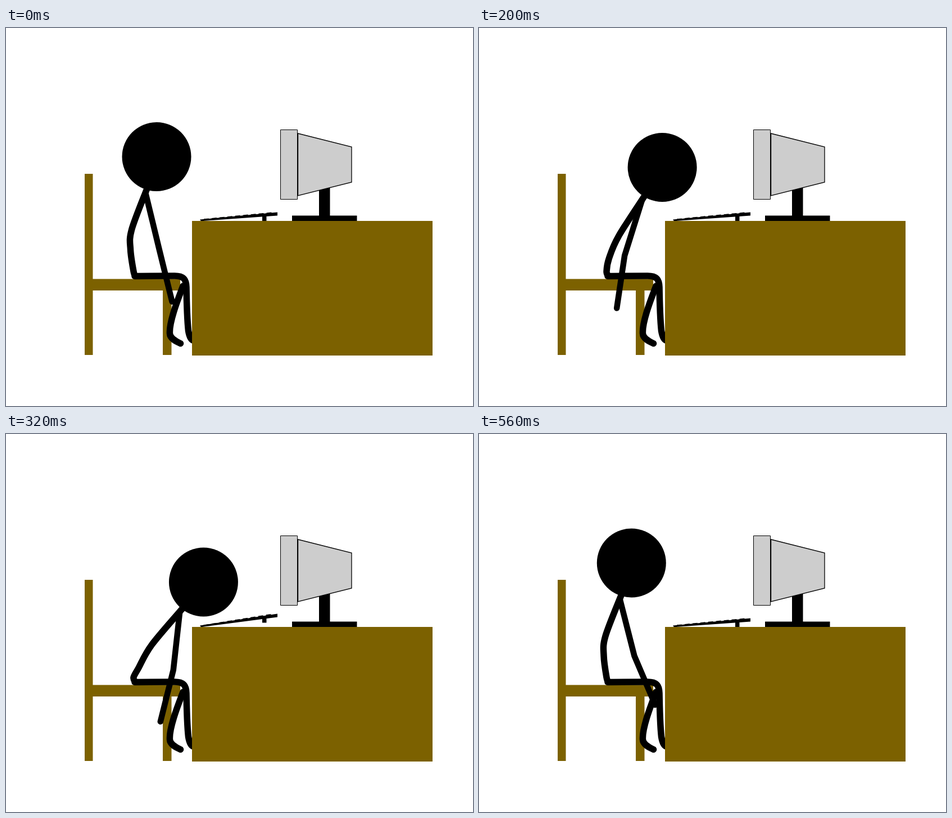
Recreate the animation shown at these times as an HTML page. Size 831 by 674 pixels, loop 600 ms.

```html
<!DOCTYPE html>
<html lang="en">
<head>
<meta charset="utf-8">
<title>Desk</title>
<style>
  html, body { margin: 0; width: 100%; height: 100%; overflow: hidden; background: #fff; }
  svg { display: block; width: 831px; height: 674px; }
  .wood { fill: #7c6100; }
  .limb { fill: none; stroke: #000; stroke-width: 11.5; stroke-linecap: round; stroke-linejoin: round; }
  .case { fill: #cdcdcd; stroke: #000; stroke-width: 1.3; }
</style>
</head>
<body>
<svg viewBox="0 0 831 674">
  <path class="wood" d="M140 260h14.500v187.500H310V468h-15.500V583H279V468H154.500V583H140z"/>

  <path d="M557 280h19.500v54.500h48V345H509v-10.500h48z"/>
  <path class="case" d="M519.500 188L615 212v63l-95.500 24z"/>
  <path class="case" d="M488.500 181.500h30v124h-30z" style="stroke-width:1"/>
  <path d="M518 188h2v111h-2z"/>

  <path id="board"/>
  <path id="keys" fill="none" stroke="#000" stroke-width="1.500" stroke-dasharray="9 5"/>
  <path id="foot"/>

  <path class="limb" d="M315 460C305 486 290 525 291.500 545C292 554 303 559 310.500 562.500"/>
  <path class="limb" d="M229 442.500L300 442C316 442 320.500 448 321 462C321.500 490 322.500 522 324.500 540Q327 555 333 557"/>
  <path class="limb" id="spine"/>
  <path class="limb" id="arm" style="stroke-width:10.500"/>
  <circle id="head" r="61.500"/>

  <path class="wood" d="M331 344h428v240H331z"/>
</svg>
<script>
const STEP = 40, COUNT = 15, HIT = 7;

const $ = id => document.getElementById(id);
const setPath = (id, d) => $(id).setAttribute('d', d);
const poly = pts => 'M' + pts.map(p => p.join(' ')).join('L');

// Smooth rise from 0 to 1 between steps a and b
function ramp(n, a, b) {
  const k = Math.min(1, Math.max(0, (n - a) / (b - a)));
  return k * k * (3 - 2 * k);
}

// Point at a distance from p, angle measured from straight down
function reach([x, y], len, deg) {
  const a = deg * Math.PI / 180;
  return [x + len * Math.sin(a), y + len * Math.cos(a)];
}

function smooth(pts) {
  let d = 'M' + pts[0];
  for (let i = 0; i < pts.length - 1; i++) {
    const a = pts[i], b = pts[i + 1];
    const prev = pts[i - 1] || a, next = pts[i + 2] || b;
    const c1 = a.map((v, j) => v + (b[j] - prev[j]) / 6);
    const c2 = b.map((v, j) => v - (next[j] - a[j]) / 6);
    d += `C${c1} ${c2} ${b}`;
  }
  return d;
}

// Speeds up into the blow, then slows down on the way back
function leanAt(n) {
  return n <= HIT ? 4.75 * n + 1.375 * n * n : 3.3 * (COUNT - n) ** 1.66;
}

function drawBody(n) {
  const lean = leanAt(n);
  const head = [268 + lean, 229.5 + 0.13 * lean + 0.0034 * lean * lean];
  const tilt = -16.7 - 0.26 * lean;

  $('head').setAttribute('cx', head[0]);
  $('head').setAttribute('cy', head[1]);
  setPath('spine', smooth([
    reach(head, 60, tilt),
    [223.5 + 0.43 * lean, 360 + 0.19 * lean],
    [221.5 + 0.17 * lean, 395 + 0.27 * lean],
    [227, 434],
    [230, 442]
  ]));

  const upper = 13.6 - 31 * ramp(n, 0, 4) + 33.6 * ramp(n, 5.5, 12) - 2.6 * ramp(n, 12, 15);
  const lower = 13.8 - 27.8 * ramp(n, 0, 7) + 37 * ramp(n, 8, 10.9);
  const shoulder = reach(head, 68, tilt);
  const elbow = reach(shoulder, 104, upper);
  setPath('arm', poly([shoulder, elbow, reach(elbow, 95, lower)]));
}

// The far edge jumps first, the near edge follows, both drop together
function drawKeyboard(n) {
  const drop = ramp(n, 10, 12.3);
  const left = 9 * (ramp(n, 8, 10) - drop);
  const right = 8 * (ramp(n, HIT, 8) - drop);
  const l = 343 - left, r = 331.5 - right;
  setPath('board', poly([[345, l - 1.5], [483, r - 3], [483, r + 3], [347, l + 1.2]]) + 'z');
  setPath('keys', poly([[352, l - 1.9], [476, r - 2.6]]));
  setPath('foot', `M456 ${336 - right}h7.500v8.500h-7.500z`);
}

function draw(n) {
  drawBody(n);
  drawKeyboard(n);
}

let shown = 0;
function tick(now) {
  const n = Math.floor(now / STEP) % COUNT;
  if (n !== shown) draw(shown = n);
  requestAnimationFrame(tick);
}
draw(0);
requestAnimationFrame(tick);
</script>
</body>
</html>
```
